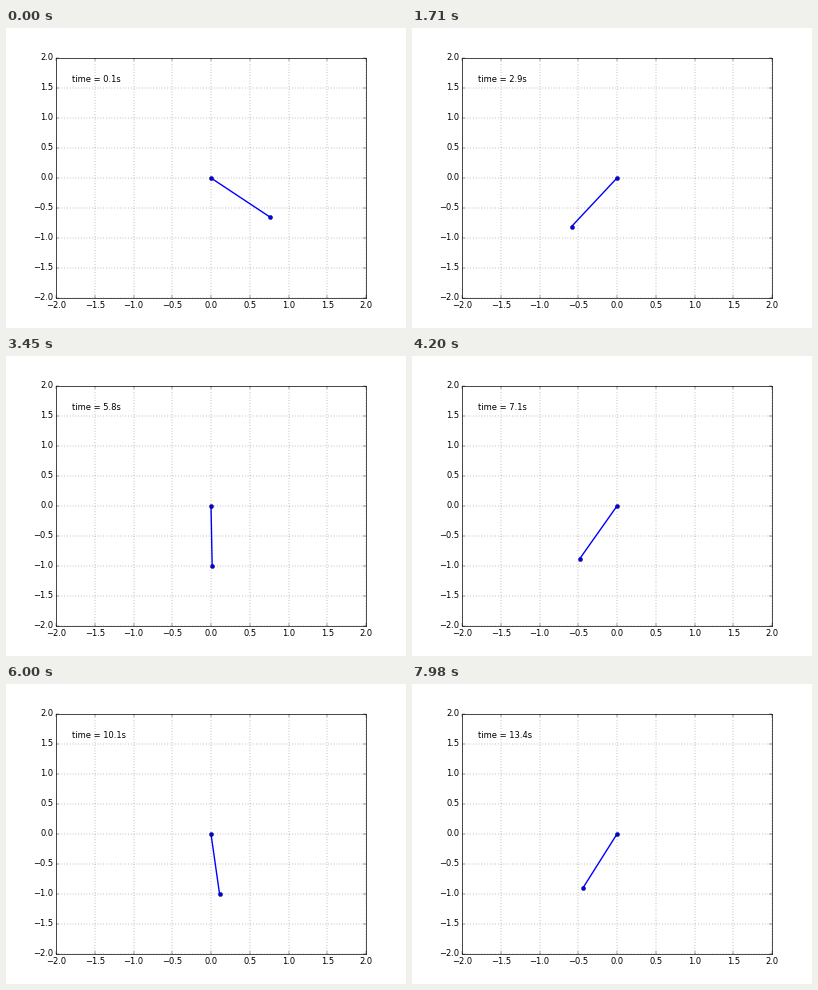
Animation, 400 px wide and 300 px high, one loop 8000 ms. Source, as a matplotlib script:

```python
import numpy as np
import matplotlib.pyplot as plt
from matplotlib.animation import FuncAnimation

plt.style.use("classic")
plt.rcParams.update({
    "font.family": "DejaVu Sans",
    "figure.facecolor": "white",
    "savefig.facecolor": "white",
    "savefig.dpi": "figure",
})

GRAVITY = 9.8
LENGTH = 1.0
DT = 0.05            # simulated seconds per step
STEP_MS = 30         # time on screen per step
LOOP_MS = 8000
TICK_MS = 20
SUBSTEPS = 10


def slope(state):
    theta, omega = state
    return np.array([omega, -GRAVITY / LENGTH * np.sin(theta)])


def rk4(state, h):
    k1 = slope(state)
    k2 = slope(state + h / 2 * k1)
    k3 = slope(state + h / 2 * k2)
    k4 = slope(state + h * k3)
    return state + h / 6 * (k1 + 2 * k2 + 2 * k3 + k4)


def swing(start_deg, steps):
    """Angles of a pendulum released from rest, one per DT."""
    state = np.array([np.radians(start_deg), 0.0])
    angles = [state[0]]
    for _ in range(steps):
        for _ in range(SUBSTEPS):
            state = rk4(state, DT / SUBSTEPS)
        angles.append(state[0])
    return np.array(angles)


angles = swing(50, LOOP_MS // STEP_MS + 2)

fig = plt.figure(figsize=(8, 6), dpi=50)
ax = fig.add_subplot(111, autoscale_on=False, xlim=(-2, 2), ylim=(-2, 2))
ticks = np.arange(-2, 2.1, 0.5)
ax.set_xticks(ticks)
ax.set_yticks(ticks)
ax.grid(True)

rod, = ax.plot([], [], "bo-", lw=2)
clock = ax.text(0.05, 0.9, "", transform=ax.transAxes)


def update(frame):
    # each tick shows the step that is current at its midpoint
    step = (frame * TICK_MS + TICK_MS // 2) // STEP_MS + 1
    theta = angles[step]
    rod.set_data([0, LENGTH * np.sin(theta)], [0, -LENGTH * np.cos(theta)])
    clock.set_text(f"time = {step * DT:.1f}s")
    return rod, clock


anim = FuncAnimation(fig, update, frames=LOOP_MS // TICK_MS,
                     init_func=lambda: update(0), interval=TICK_MS,
                     repeat=True, repeat_delay=0, blit=False)

plt.show()
```
